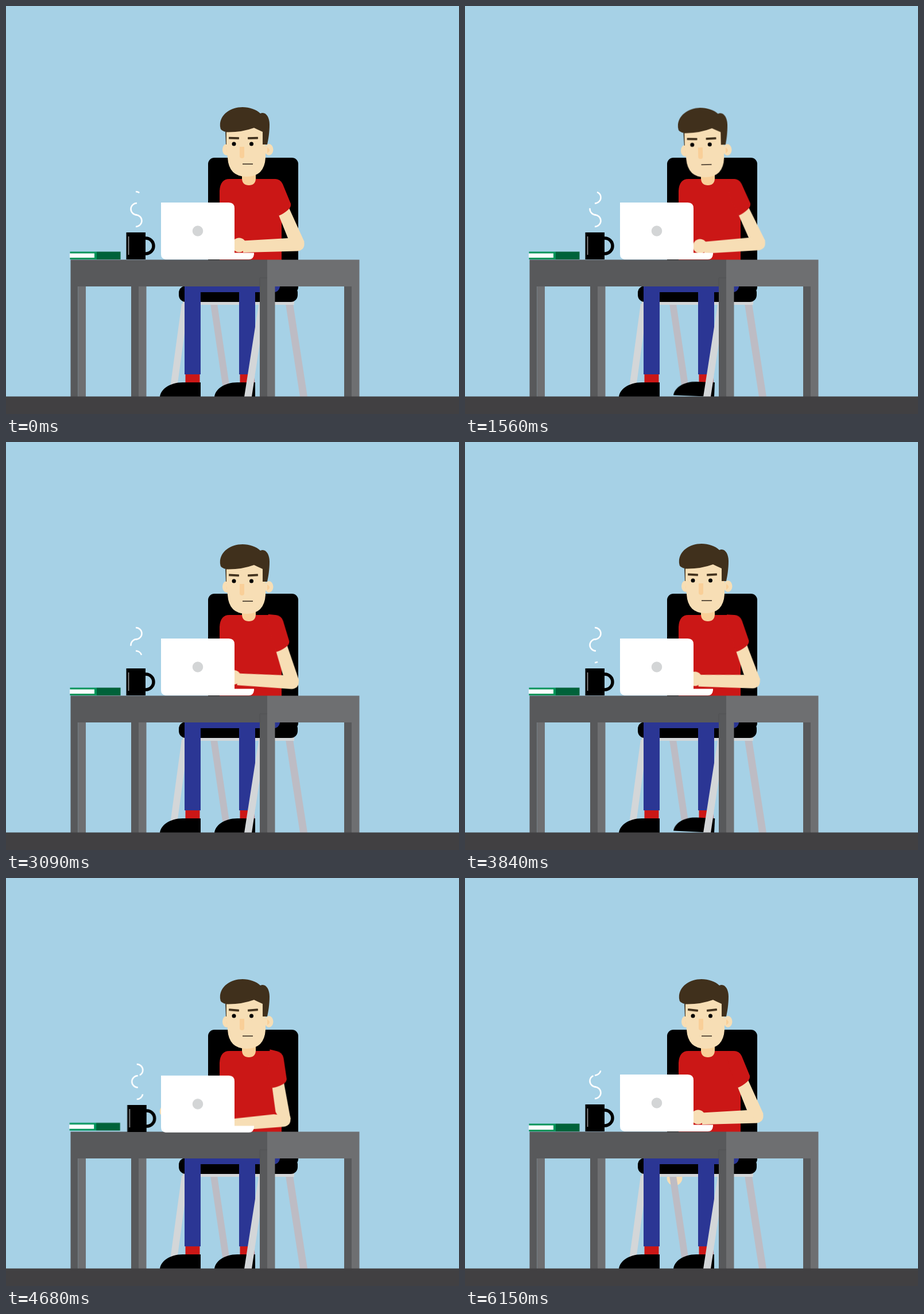
These frames come from a looping animation (789 px wide and 710 px high, 6180 ms). An HTML page without scripts:

```html
<!DOCTYPE html>
<html lang="en">
<head>
<meta charset="utf-8">
<title>At the desk</title>
<style>
/* --beat counts 0.9 s steam cycles, --lap is its whole part */
@property --beat { syntax: "<number>"; inherits: true; initial-value: 0; }
@property --lap { syntax: "<integer>"; inherits: false; initial-value: 0; }

html, body { margin: 0; width: 100%; height: 100%; overflow: hidden; background: #a6d1e6; }
svg { display: block; width: 100vw; height: 100vh; animation: beat 6.18s linear infinite; }
@keyframes beat { to { --beat: 6.8667; } }
.move { animation: 6.18s ease-in-out infinite; }

.skin { fill: #f7deb5; }
.blush { fill: #f9cf98; }
.hair { fill: #40301c; }
.red { fill: #cb1716; }
.blue { fill: #2b3694; }
.dark { fill: #58595b; }
.mid { fill: #6e6f71; }
.steel { fill: #d3d6d8; }
.steel2 { fill: #bdbcc4; }

/* typing: the arm swings at the shoulder, the elbow gives on the slam */
.arm { animation-name: type; transform-origin: 468px 318px; }
.fore { animation-name: slam; transform-origin: 506px 413px; }
@keyframes type {
  0%, 36%, 82%, 100% { transform: none; }
  5%, 25%, 56%, 73% { transform: rotate(-2deg); }
  15%, 44%, 51% { transform: rotate(5.6deg); }
  62% { transform: rotate(3.4deg); }
  75.5%, 79% { transform: rotate(14deg); }
}
@keyframes slam {
  0%, 73%, 82%, 100% { transform: none; }
  75.5%, 79% { transform: rotate(-17deg); }
}

.head { animation-name: nod; transform-origin: 420px 297px; }
.brow { animation-name: frown; transform-origin: 397px 230px; }
@keyframes nod {
  0%, 36%, 75%, 100% { transform: none; }
  15% { transform: translateY(2px) rotate(-2.4deg); }
  50% { transform: translateY(2px); }
  62% { transform: translateY(1px); }
}
@keyframes frown {
  0% { transform: rotate(1.5deg); }
  15% { transform: rotate(7deg); }
  36%, 50%, 86%, 100% { transform: none; }
  62% { transform: rotate(4.5deg); }
}

.foot { animation-name: tap; transform-origin: 434px 680px; }
@keyframes tap {
  0%, 15%, 30%, 50%, 75%, 100% { transform: none; }
  7%, 23%, 36%, 62% { transform: rotate(2.9deg); }
}

/* everything on the desk jumps by its own --x, --y */
.jolt { animation-name: jolt; }
@keyframes jolt {
  0%, 74%, 81%, 100% { transform: none; }
  75.5%, 79% { transform: translate(var(--x), var(--y)); }
}

.drop { animation-name: drop; }
@keyframes drop {
  0%, 82% { transform: translateY(-24px); }
  86%, 92%, 100% { transform: none; }
  89%, 96% { transform: translateY(-4px); }
}

/* steam: each curl is drawn on, held, then wiped off, shifted by --shift */
.steam path {
  --lap: calc(var(--beat) + var(--shift) - .5);
  --u: (var(--beat) + var(--shift) - var(--lap));
  fill: none; stroke: #fff; stroke-width: 2.5; stroke-dasharray: 32 32;
  stroke-dashoffset: calc(32px * (clamp(0, 1 - var(--u) / .32, 1) - clamp(0, (var(--u) - .77) / .23, 1)));
}
</style>
</head>
<body>
<svg viewBox="0 0 789 710" preserveAspectRatio="none">
  <defs>
    <path id="shoe" d="M268 680C269 668 284 655 308 655H339V680Z"/>
    <g id="leg"><path class="dark" d="M0 488H13V680H0Z"/><path class="mid" d="M13 488H26.500V680H13Z"/></g>
    <rect id="brow" class="hair move brow" x="388" y="228" width="18" height="3.800" rx="1"/>
  </defs>
  <rect width="789" height="710" fill="#a6d1e6"/>

  <!-- chair -->
  <circle class="skin move drop" cx="365" cy="522" r="13.500"/>
  <path class="steel2" d="M356 518H368L389 660H377ZM487 518H500L525 680H512Z"/>
  <path class="steel" d="M306 518H318L298 664H286ZM308 514H502V520H308Z"/>
  <rect x="352" y="264" width="157" height="236" rx="11"/>
  <rect x="301" y="487" width="207" height="28" rx="12"/>

  <!-- legs -->
  <path class="blue" d="M311 480H477V489Q475 498 466 498H434V641H406V498H339V641H311Z"/>
  <path class="red" d="M312.500 641H337.500V656H312.500ZM407.500 641H432.500V656H407.500Z"/>
  <use href="#shoe"/>
  <g class="move foot"><use href="#shoe" x="95"/></g>
  <path class="steel" d="M440 520H452L428 680H415Z"/>

  <!-- body -->
  <path class="red" d="M372 445V322Q373 301 389 301H468Q480 303 480 325V445Z"/>
  <g class="move arm">
    <g class="move fore">
      <path class="skin" d="M491 404L413 408.500V429L508 426.500Q522 424 519 409Z"/>
      <circle class="skin" cx="406" cy="416" r="12.500"/>
    </g>
    <path class="skin" d="M473 359L491 404L506 420L519.500 410L490 345Z"/>
    <path class="red" d="M455 301H468Q478 301 482 310L496 344Q497 350 491 355Q483 362 475 365L460 330Z"/>
  </g>
  <path class="blush" d="M411 285H435V301Q434 312 423 312Q412 312 411 301Z"/>

  <!-- head -->
  <g class="move head">
    <ellipse class="skin" cx="384" cy="250" rx="7" ry="10"/>
    <ellipse class="skin" cx="458" cy="250" rx="7.500" ry="10"/>
    <path class="blush" d="M386 246Q382 251 386 256ZM455 246Q463 251 455 256Z"/>
    <path class="skin" d="M383 212V240L386 264Q388 297 419 297Q450 297 452 264V212Z"/>
    <path class="hair" d="M382 215H384V241H383ZM373 210C371 190 390 176 412 176C424 176 436 180 443 187C452 183 459 193 459 206C459 220 457 232 455 241H447V219Q438 215 432 212Q410 220 385 219.500Q373 218 373 210Z"/>
    <path class="blush" d="M407 245H415V261Q415 265 411 265Q407 265 407 261Z"/>
    <circle cx="397" cy="240" r="3.500"/>
    <circle cx="427.500" cy="240" r="3.500"/>
    <path d="M412 275H430" stroke="#30261c" stroke-width="1.500"/>
    <use href="#brow"/>
    <use href="#brow" transform="matrix(-1 0 0 1 827 0)"/>
  </g>

  <!-- table -->
  <path class="dark" d="M112.500 441.500H455V488H112.500Z"/>
  <path class="mid" d="M455 441.500H615.500V488H455Z"/>
  <use href="#leg" x="112.500"/>
  <use href="#leg" x="218"/>
  <use href="#leg" x="442"/>
  <use href="#leg" x="589"/>
  <path d="M442 488V473H455" fill="none" stroke="#515254"/>
  <rect y="679.500" width="789" height="31" fill="#414042"/>

  <!-- things on the table -->
  <g class="move jolt" style="--x:-.8px;--y:-1.5px">
    <path fill="#00945a" d="M111.500 427.500H158V441H111.500Z"/>
    <path fill="#00623a" d="M158 427.500H199.500V441H158Z"/>
    <path fill="#fff" d="M111 430.500H154V438H111Z"/>
  </g>
  <g class="move jolt" style="--x:1.7px;--y:1px">
    <circle cx="243.500" cy="417.500" r="13.500" fill="none" stroke="#000" stroke-width="5.500"/>
    <path d="M209.500 394H243V441H209.500Z"/>
    <path d="M213.500 401V433" stroke="#8a8a8a" stroke-width="1.800"/>
    <g class="steam">
      <path style="--shift:.065" pathLength="32" d="M226 323A10.500 10.200 0 0 1 226 343.400"/>
      <path style="--shift:.44" pathLength="32" d="M228 363.500A10.500 10.200 0 0 1 228 343.100"/>
      <path style="--shift:.695" pathLength="32" d="M226 363.500A10.500 10.200 0 0 1 226 383.900"/>
    </g>
  </g>
  <circle class="skin move jolt" style="--x:-12px;--y:0px" cx="289" cy="406" r="9.500"/>
  <g class="move jolt" style="--x:0px;--y:1.8px">
    <path fill="#fff" d="M270 342H388Q398 342 398 352V429.500H432V432Q431 441 423 441H278Q270 440 270 432Z"/>
    <circle cx="334" cy="391.500" r="9.300" fill="#d3d5d6"/>
  </g>
</svg>
</body>
</html>
```
